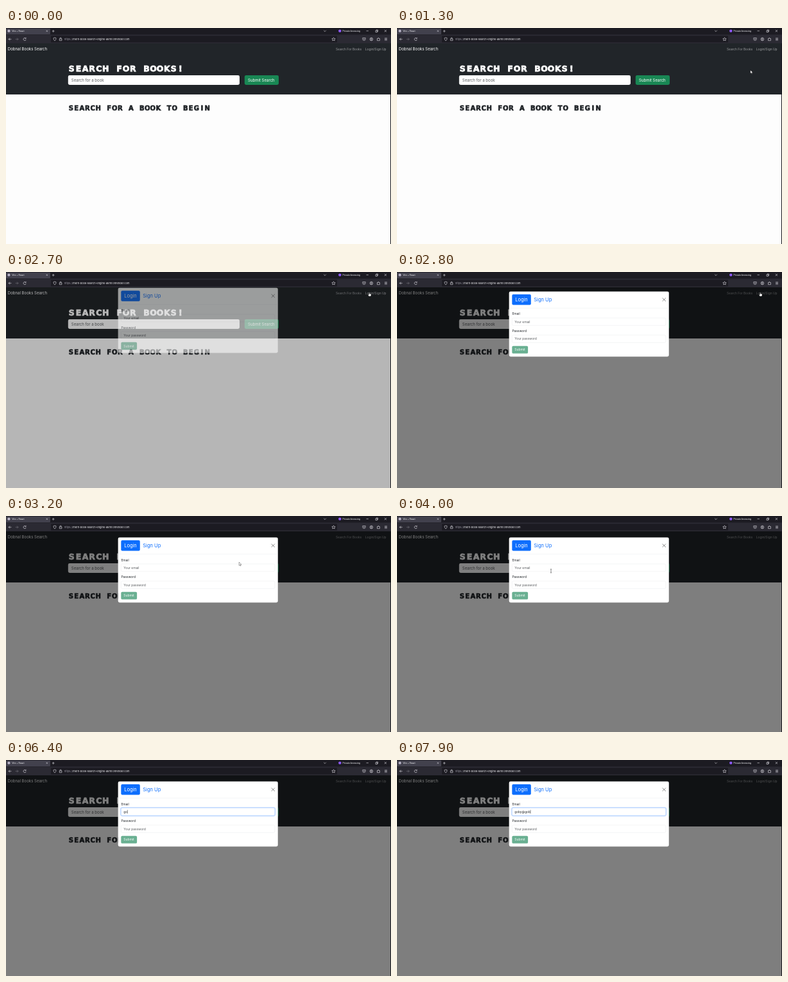
Recreate the animation shown at these times as an HTML page. Size 600 by 338 pixels, loop 8000 ms.

```html
<!DOCTYPE html>
<html lang="en">
<head>
<meta charset="utf-8">
<title>Book search</title>
<style>
  html, body { margin: 0; width: 100%; height: 100%; overflow: hidden; background: #fff; }
  svg { display: block; width: 100vw; height: 100vh; font-family: Inter, "Open Sans", sans-serif; }
  text { white-space: pre; }
  .display { font-family: "DejaVu Sans", sans-serif; font-weight: 700; text-anchor: middle; stroke-linejoin: miter; }
  .icon { fill: none; stroke: #e4e3ea; stroke-width: .6; }
  .body { font-size: 4.9px; fill: #212529; }
  .hint { font-size: 4.9px; fill: #595c5f; }
  .field { fill: #fff; stroke: #dee2e6; stroke-width: .35; }
</style>
</head>
<body>
<svg viewBox="0 0 600 338">
  <!-- page -->
  <rect y="24" width="600" height="314" fill="#fdfdfd"/>
  <rect y="24" width="600" height="80" fill="#212529"/>
  <text x="2.8" y="35.2" font-size="6.05" fill="#fff">Dobnal Books Search</text>
  <text x="514" y="34.8" font-size="4.8" fill="#fff" fill-opacity=".55">Search For Books</text>
  <text id="link" x="559.8" y="34.8" font-size="4.9" fill="#fff">Login/Sign Up</text>
  <text id="title" class="display" font-size="12.4" fill="#fff" stroke="#fff" stroke-width=".8"></text>
  <rect x="96.8" y="74" width="267.2" height="15" rx="2.4" fill="#fff"/>
  <text x="101.8" y="83.9" font-size="6.05" fill="#595c5f">Search for a book</text>
  <rect x="371.8" y="74" width="53.2" height="15" rx="2.4" fill="#198754"/>
  <text x="377" y="83.9" font-size="6.05" fill="#fff">Submit Search</text>
  <text id="prompt" class="display" font-size="10" fill="#212529" stroke="#212529" stroke-width=".65"></text>

  <rect id="shade" y="24" width="600" height="314"/>

  <!-- dialog -->
  <g id="modal">
    <rect x="174.6" y="33.5" width="249.2" height="102" rx="2.4" fill="#fff" stroke="#000" stroke-opacity=".18" stroke-width=".3"/>
    <path d="M174.8 59.7H423.6" stroke="#dee2e6" stroke-width=".35"/>
    <rect x="179.3" y="38.1" width="29.5" height="16.4" rx="1.9" fill="#0d6efd"/>
    <text x="184.2" y="49" font-size="7.5" fill="#fff">Login</text>
    <text x="213.3" y="49" font-size="7.5" fill="#0d6efd">Sign Up</text>
    <path d="M413.9 43.9l4.7 4.7m0-4.7l-4.7 4.7" stroke="#000" stroke-opacity=".6" stroke-width=".75" stroke-linecap="round"/>
    <text class="body" x="179.4" y="70.5">Email</text>
    <rect id="ring" x="178.7" y="74.3" width="240.8" height="13.2" rx="2.5" fill="none" stroke="#0d6efd" stroke-width="1.25"/>
    <rect id="email" class="field" x="179.4" y="75" width="239.4" height="11.8" rx="1.9"/>
    <text id="emailHint" class="hint" x="183.3" y="82.7">Your email</text>
    <text id="typed" class="body" style="font-size:4.75px" x="183.3" y="82.7"></text>
    <path id="caret" d="M0 78v5.9" stroke="#111" stroke-width=".45"/>
    <text class="body" x="179.4" y="97.4">Password</text>
    <rect class="field" x="179.4" y="101.8" width="239.4" height="11.8" rx="1.9"/>
    <text class="hint" x="183.3" y="109.5">Your password</text>
    <rect x="179.3" y="118.7" width="24.8" height="11.9" rx="1.9" fill="#6ab092"/>
    <text x="183.3" y="126.4" font-size="4.95" fill="#fff">Submit</text>
  </g>
  <rect x="599" y="24" width="1" height="314" fill="#18181c"/>

  <!-- browser bars -->
  <rect width="600" height="24" fill="#1c1b22"/>
  <rect y="10.3" width="600" height="13.7" fill="#2b2a33"/>
  <rect y=".8" width="69" height="9.2" rx="1" fill="#42414d"/>
  <rect x="70" y="12.2" width="446" height="10.4" rx="1.2" fill="#1c1b22"/>
  <circle cx="4.5" cy="4.7" r="2.1" fill="#b9b4c8"/>
  <text x="9.2" y="6" font-size="3.4" fill="#fbfbfe">Vite + React</text>
  <circle cx="520.3" cy="4.6" r="2.2" fill="#9059ff"/>
  <text x="524.6" y="5.9" font-size="3.45" fill="#fbfbfe">Private browsing</text>
  <text x="90.8" y="19" font-size="3.97" fill="#9b9aa5">https://<tspan fill="#fbfbfe">mern-book-search-engine-a5mr.onrender.com</tspan></text>
  <g class="icon">
    <path d="M62.7 3.6l2.2 2.2m0-2.2l-2.2 2.2M73.7 3v3.8M71.8 4.9h3.8M495.2 3.8l1.8 1.8 1.8-1.8"/>
    <path d="M561.5 4.6h3.4M576 4h2.6v2.6h-2.6zM577 4v-1h2.6v2.6h-1M589.8 3l3.2 3.2m0-3.2l-3.2 3.2"/>
    <path d="M8.4 17.5H4.2m1.9-2l-2 2 2 2"/>
    <path d="M14.8 17.5H19m-1.9-2l2 2-2 2" stroke="#77767f"/>
    <path d="M30.7 16.1a2.1 2.1 0 1 0 .5 1.9M31.1 14.9v1.6h-1.6"/>
    <path d="M76 15l2 .7c0 2-.5 3.4-2 4.3-1.500-.9-2-2.300-2-4.300zM83.300 17h3.600v2.700h-3.600zM84 17v-.8a1.100 1.100 0 0 1 2.200 0v.8"/>
    <path d="M510.500 14.800l.8 1.700 1.900.2-1.400 1.300.4 1.900-1.700-1-1.700 1 .4-1.900-1.400-1.300 1.900-.2z"/>
    <path d="M555.800 15.500h4.400v1.800a2.200 2.200 0 0 1-4.400 0zM556.900 16.900l1.100 1 1.100-1"/>
    <circle cx="569.400" cy="17.500" r="2.300"/><circle cx="569.400" cy="16.800" r=".8"/>
    <path d="M567.900 19.200q1.500-1.500 3 0"/>
    <path d="M578.500 16.500h1.300v-.9h1.200v.9h1.400v3.200h-3.900zM590 15.900h4M590 17.500h4M590 19.100h4"/>
  </g>

  <!-- pointer shapes, tip at the origin -->
  <g id="pointer">
    <path id="arrow" d="M0 0V5.300L1.300 4.200 2.100 6 2.900 5.600 2.100 3.900H3.800Z" fill="#fff" stroke="#000" stroke-width=".35"/>
    <path id="hand" d="M-.5 0Q0-.5.5 0V2Q2.600 2 3 3.100V4.600L2.300 6H-.6L-2 3.600Q-1.700 2.900-.5 3.600Z" fill="#fff" stroke="#000" stroke-width=".35"/>
    <path id="beam" d="M0-2.700V2.700M-1-3Q0-3 0-2.600 0-3 1-3M-1 3Q0 3 0 2.600 0 3 1 3" fill="none" stroke="#111" stroke-width=".5"/>
  </g>
</svg>
<script>
const LOOP = 8000, STEP = 100, OPEN = 2615, FOCUS = 5300, TYPE = 6300;
const $ = id => document.getElementById(id);
const set = (id, attrs) => { for (const k in attrs) $(id).setAttribute(k, attrs[k]); };
const show = (id, on) => set(id, { visibility: on ? "visible" : "hidden" });
const clamp = v => Math.max(0, Math.min(1, v));

// Headline letters sit on a fixed-pitch grid.
function headline(id, str, y, pitch) {
  const x = [...str].map((c, i) => (97 + (i + .5) * pitch).toFixed(2)).join(" ");
  set(id, { x, y });
  $(id).textContent = str;
}
headline("title", "SEARCH FOR BOOKS!", 68.4, 10.6);
headline("prompt", "SEARCH FOR A BOOK TO BEGIN", 128.6, 8.5);

const ADDRESS = "goby@gob";
const KEYS = [6300, 6400, 6600, 6700, 7200, 7500, 7700, 7900];

// time, x, y
const PATH = [
  [800, 470, 130], [1200, 545, 72], [1600, 582, 33], [2000, 566, 32],
  [2900, 566, 32], [3400, 253, 94], [4000, 240, 86], [4200, 240, 86], [4900, 218.400, 78.600]
];

function pointerAt(t) {
  const i = PATH.findIndex(p => p[0] > t);
  if (i < 0) return PATH[PATH.length - 1].slice(1);
  if (i === 0) return PATH[0].slice(1);
  const [t0, x0, y0] = PATH[i - 1], [t1, x1, y1] = PATH[i];
  const u = (t - t0) / (t1 - t0), e = u * u * (3 - 2 * u);
  return [x0 + (x1 - x0) * e, y0 + (y1 - y0) * e];
}

function drawPointer(t) {
  const [x, y] = pointerAt(t);
  const kind = t >= 1600 && t <= 2900 ? "hand" : t >= 3700 ? "beam" : "arrow";
  const on = t >= 800 && t < TYPE;
  for (const id of ["arrow", "hand", "beam"]) show(id, on && id === kind);
  set("pointer", { transform: `translate(${x} ${y})` });
}

function drawModal(t) {
  const fade = clamp((t - OPEN) / 150);
  const slide = Math.pow(1 - clamp((t - OPEN) / 300), 1.7);
  set("shade", { opacity: fade * .5 });
  set("modal", { opacity: fade, transform: `translate(0 ${-15.6 * slide})` });
}

function drawField(t) {
  const focus = clamp((t - FOCUS) / 150);
  set("ring", { opacity: focus * .25 });
  $("email").style.stroke = focus ? "#86b7fe" : "#dee2e6";
  const n = KEYS.filter(k => k <= t).length;
  $("typed").textContent = ADDRESS.slice(0, n);
  show("emailHint", n === 0);
  show("caret", t >= FOCUS && (t < FOCUS + 500 || t >= TYPE));
  const w = n ? $("typed").getComputedTextLength() : 0;
  set("caret", { transform: `translate(${183.5 + w} 0)` });
}

function draw(t) {
  const hover = clamp((t - 1550) / 150) - clamp((t - OPEN) / 150);
  set("link", { "fill-opacity": .58 + .2 * hover });
  drawModal(t);
  drawField(t);
  drawPointer(t);
}

function tick() {
  draw(Math.floor((performance.now() % LOOP) / STEP) * STEP);
  requestAnimationFrame(tick);
}
tick();
</script>
</body>
</html>
```
